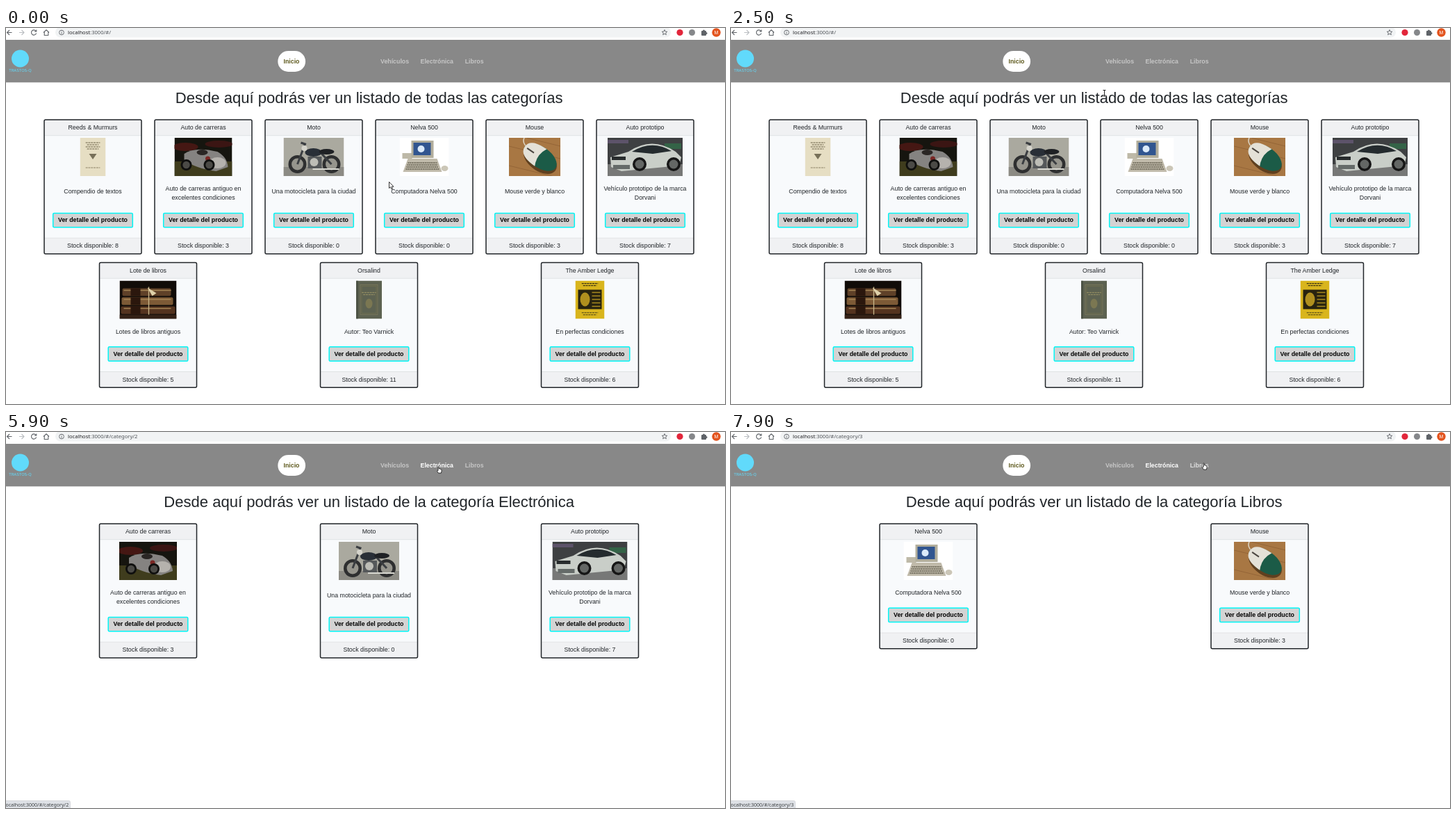
Animation, 1035 px wide and 541 px high, one loop 8000 ms. Source, as an HTML page:

```html
<!DOCTYPE html>
<html lang="es">
<head>
<meta charset="utf-8">
<title>Catálogo</title>
<style>
  html, body { margin: 0; width: 100%; height: 100%; overflow: hidden; background: #fff; }
  svg { display: block; }
  text { font: 8.82px "Liberation Sans", Arial, sans-serif; fill: #212529; white-space: pre; }
  .mid { text-anchor: middle; }
  .bold { font-weight: 700; }
  .button { font-weight: 700; fill: #000; }
  .heading { font-size: 22.06px; }
  .url { font: 7.6px "Noto Sans", sans-serif; fill: #202124; }
  .url tspan { fill: #505459; }
  .status { font: 7px "Noto Sans", sans-serif; fill: #3c4043; }
  .brand { font: 5.6px "DejaVu Sans", sans-serif; fill: #61dafb; }
</style>
</head>
<body>
<svg id="stage" width="1035" height="541" viewBox="0 0 1035 541"><g id="page"></g><g id="cursor"></g></svg>
<script>
const LOOP = 8000, STEP = 100;
const UNIT = 8.82;            // root font size; spacing follows from it
const LINE = UNIT * 1.5;

const rect = (x, y, w, h, fill, more = '') =>
  `<rect x="${x}" y="${y}" width="${w}" height="${h}" fill="${fill}" ${more}/>`;
const oval = (x, y, rx, ry, fill, more = '') =>
  `<ellipse cx="${x}" cy="${y}" rx="${rx}" ry="${ry}" fill="${fill}" ${more}/>`;
const disc = (x, y, r, fill, more) => oval(x, y, r, r, fill, more);
const shape = (d, fill) => `<path d="${d}" fill="${fill}"/>`;
const line = (d, color, w = 1, more = '') =>
  `<path d="${d}" fill="none" stroke="${color}" stroke-width="${w}" ${more}/>`;
const text = (x, y, s, cls = 'mid', more = '') => `<text x="${x}" y="${y}" class="${cls}" ${more}>${s}</text>`;
const repeat = (n, draw) => Array.from({ length: n }, (_, i) => draw(i)).join('');

// Parts shared by the product pictures, which are all H tall
const H = 55;
const wheels = (xs, y, r, tyre, hub) => xs.map(x => disc(x, y, r, tyre) + disc(x, y, r * .65, hub)).join('');
const lettering = (w, y, n, color) =>
  repeat(n, i => line(`M${w * .22 + i % 2 * 2} ${y + i * 3}H${w * .78 - i % 2 * 2}`, color, 1.3, 'stroke-dasharray="3 .8"'));
const frame = (w, inset, color) =>
  rect(inset, inset, w - 2 * inset, H - 2 * inset, 'none', `stroke="${color}" stroke-width=".7"`);

const pictures = {
  songs: [37, w => rect(0, 0, w, H, '#e6dec3') + lettering(w, 7, 4, '#938a70') +
    shape('M13 23H24L18.5 31z', '#777059') + lettering(w, 43, 1, '#aaa185')],
  racer: [83, w => rect(0, 0, w, H, '#16150f') + rect(0, 34, w, 21, '#3f3c1d') +
    oval(16, 13, 18, 6, '#451713') + oval(64, 9, 20, 5, '#3b1513') +
    shape('M14 23Q30 12 62 20Q76 28 77 42L60 48Q30 44 14 32z', '#858381') +
    oval(62, 36, 12, 8, '#b5b2ad') + oval(40, 21, 8, 4, '#2a2624') + disc(48, 30, 3.5, '#7a2724') +
    wheels([17, 50], 39, 8, '#0f0f0e', '#4b4a46')],
  moto: [87, w => rect(0, 0, w, H, '#aaa99f') + rect(0, 42, w, 13, '#8c8b84') +
    wheels([20, 69], 38, 13, '#2e2f30', '#96958d') + line('M20 38 31 9 25 7M69 38 54 22', '#3b3e42', 3) +
    oval(43, 21, 12, 6, '#292f37') + oval(62, 20, 11, 4, '#1f2124') + disc(30, 15, 4, '#d4d3cb') +
    rect(35, 27, 20, 17, '#55585a') + disc(44, 35, 6, '#bdbdb6') + line('M42 45H80', '#d9d9d2', 2)],
  computer: [71, w => rect(0, 0, w, H, '#fff') + rect(4, 22, 14, 8, '#beb9a8') + rect(17, 4, 32, 25, '#b2ae9c') +
    rect(20, 7, 25, 18, '#315590') + disc(31, 16, 5, '#dbeafa') +
    shape('M12 30H54L61 49H5z', '#c0baaa') +
    repeat(4, i => line(`M${12 - i} ${36 + i * 3}H${54 + i}`, '#777262', 1.8, 'stroke-dasharray="2 .7"')) +
    oval(65, 44, 5, 4, '#cbc6b7')],
  mouse: [74, w => rect(0, 0, w, H, '#a87743') + line('M0 12 74 30M0 40 74 58M25 0 74 12', '#946537') +
    line('M29 16Q18 8 22 0', '#ddd6c6', 1.5) +
    `<g transform="rotate(35 45 28)">${oval(47, 31, 27, 16, '#60401f') + oval(45, 28, 27, 15, '#1b5b47') +
    shape('M46 13Q18 13 18 28T46 43Q38 28 46 13z', '#e4e1d7') + line('M22 28H34', '#4b4640', 2)}</g>`],
  concept: [108, w => rect(0, 0, w, H, '#3e4042') + rect(0, 38, w, 17, '#777877') +
    rect(0, 3, 30, 5, '#5d536a') + rect(82, 8, 24, 8, '#346347') +
    shape('M4 28 30 20Q64-3 98 20L106 28 103 40 20 48 5 42z', '#c9cec8') +
    shape('M35 20Q64 2 92 19L65 23z', '#242b2e') + rect(6, 27, 20, 5, '#282c2d') + rect(8, 39, 24, 6, '#656b69') +
    wheels([46, 95], 38, 10, '#161616', '#646765')],
  bundle: [82, w => rect(0, 0, w, H, '#110c08') + rect(0, 49, w, 6, '#342116') +
    repeat(3, i => rect(4 - i, 11 + i * 13, 70 + i * 4, 11, ['#5f4128', '#7d5a36', '#54331f'][i], 'rx="2"') +
      line(`M6 ${14 + i * 13}H74`, '#a58555', 1.5) + rect(16, 11 + i * 13, 14, 11, '#2b170d')) +
    line('M42 9V49', '#c8b68a', 1.3) + shape('M40 10 53 18 47 22z', '#dfd2aa')],
  green: [37, w => rect(0, 0, w, H, '#5d6251') + rect(0, 0, 3, H, '#4c5245') + frame(w, 6, '#807c5c') + frame(w, 8, '#74724f') +
    lettering(w, 17, 2, '#918b61') + oval(18.5, 33, 5, 7, '#7b7752')],
  yellow: [42, w => rect(0, 0, w, H, '#d9b51d') + lettering(w, 4, 2, '#3c3415') + rect(4, 13, 34, 28, '#28230f') +
    oval(14, 27, 7, 10, '#b08f1e') + repeat(5, i => line(`M24 ${17 + i * 5}H36`, '#a98a1f', 1.6)) + lettering(w, 46, 2, '#655718')]
};

const [VEHICLES, DEVICES, BOOKS] = [1, 2, 3];
const products = [
  ['Reeds &amp; Murmurs', 'songs', 8, BOOKS, 'Compendio de textos'],
  ['Auto de carreras', 'racer', 3, VEHICLES, 'Auto de carreras antiguo en', 'excelentes condiciones'],
  ['Moto', 'moto', 0, VEHICLES, 'Una motocicleta para la ciudad'],
  ['Nelva 500', 'computer', 0, DEVICES, 'Computadora Nelva 500'],
  ['Mouse', 'mouse', 3, DEVICES, 'Mouse verde y blanco'],
  ['Auto prototipo', 'concept', 7, VEHICLES, 'Vehículo prototipo de la marca', 'Dorvani'],
  ['Lote de libros', 'bundle', 5, BOOKS, 'Lotes de libros antiguos'],
  ['Orsalind', 'green', 11, BOOKS, 'Autor: Teo Varnick'],
  ['The Amber Ledge', 'yellow', 6, BOOKS, 'En perfectas condiciones']
];

const cardHeight = tall => 179.7 + (tall ? LINE : 0);

function card([name, pic, stock, , ...lines], cx, y, tall) {
  const w = 140, bar = 22.7, h = cardHeight(tall), x = cx - w / 2, buttonY = y + h - 58.4;
  const [picWidth, paint] = pictures[pic];
  const firstLine = y + 102.2 + (tall && lines.length < 2 ? LINE / 4 : 0);
  return rect(x, y, w, h, '#f0f1f3') + rect(x, y + bar, w, h - 2 * bar, '#f8fafc') +
    line(`M${x} ${y + bar}h${w}M${x} ${y + h - bar}h${w}`, '#d9dbdd', .7) +
    rect(x, y, w, h, 'none', 'rx="2" stroke="#212529" stroke-width="1.5"') +
    text(cx, y + 14.2, name) +
    `<svg x="${cx - picWidth / 2}" y="${y + 26}" width="${picWidth}" height="${H}">${paint(picWidth)}</svg>` +
    lines.map((s, i) => text(cx, firstLine + i * LINE, s)).join('') +
    rect(cx - 57.3, buttonY, 114.6, 20.3, '#d3d3d3', 'rx="1.5" stroke="#00f5f5" stroke-width="1.5"') +
    text(cx, buttonY + 12.8, 'Ver detalle del producto', 'mid button') +
    text(cx, y + h - 8.6, 'Stock disponible: ' + stock);
}

function grid(category) {
  const items = products.filter(p => !category || p[3] === category);
  let out = '';
  for (let i = 0, y = 132; i < items.length; i += 6) {
    const row = items.slice(i, i + 6), tall = row.some(p => p.length > 5), step = 954 / row.length;
    out += row.map((p, k) => card(p, 45.5 + step * (k + .5), y, tall)).join('');
    y += cardHeight(tall) + 12.6;
  }
  return out;
}

function browserBar(path) {
  const ink = '#5f6368', y = 6.5;
  const arrow = (x, dir, color) => line(`M${x} ${y}h${7 * dir}m${-3.5 * dir}-3.5l${3.5 * dir} 3.5l${-3.5 * dir} 3.5`, color, 1.1);
  const star = repeat(10, i => {
    const a = (i / 5 - .5) * Math.PI, r = i % 2 ? 1.8 : 4;
    return `${i ? 'L' : 'M'}${948 + r * Math.cos(a)} ${y + r * Math.sin(a)}`;
  });
  return rect(71, -1, 886, 14.5, '#f1f3f4', 'rx="7.2"') + arrow(8.5, -1, ink) + arrow(19, 1, '#bbbec2') +
    line('M43 4.3A3.6 3.6 0 1 0 43.6 7.5M43.8 2.5V5H41', ink, 1.1) +
    line('M54 6.5 58 2.8 62 6.5M55.2 6V10.5H60.8V6', ink, 1.1) +
    disc(80, y, 3.4, 'none', `stroke="${ink}" stroke-width=".9"`) + line('M80 6V8.5M80 4.3V5.1', ink, .9) +
    text(89, 9.4, `localhost<tspan>:3000/#/${path}</tspan>`, 'url') + line(star + 'z', ink, .9) +
    disc(970, y, 4.6, '#e2263b') + disc(987.5, y, 4.5, '#85878a') +
    rect(1001, 4, 7, 7, ink, 'rx="1"') + disc(1004.5, 4, 1.5, ink) + disc(1008, 7.5, 1.5, ink) +
    disc(1022.5, y, 6.2, '#e3541e') + text(1022.5, 9, 'M', 'mid', 'style="font-size:7px;fill:#fff"');
}

const links = [['Vehículos', 539], ['Electrónica', 596.5], ['Libros', 660.7]];

function navbar(focused, hovered) {
  const color = id => id === focused ? '#fff' : id === hovered ? '#e1e1e1' : '#c6c6c6';
  return rect(0, 17, 1035, 61.3, '#888') + disc(20.5, 44, 12.5, '#61dafb') +
    text(20.5, 63, 'TRASTOS-Q', 'mid brand') +
    rect(391.3, 33, 39.8, 30, '#fff', 'rx="15"') + text(411, 50.9, 'Inicio', 'mid bold', 'style="fill:#5f5a1e"') +
    links.map(([s, x], i) => text(x, 50.9, s, 'bold', `style="fill:${color(i + 1)}"`)).join('');
}

const statusBar = (path, w) => rect(-4, 530.5, w + 4, 14, '#dee1e6', 'rx="2" stroke="#c9ccd1" stroke-width=".6"') +
  text(-2.4, 539.3, 'localhost:3000/#/' + path, 'status');

// Times at which each category is hovered, focused, routed to and loaded
const never = Infinity;
const visits = [
  { hover: 4100, focus: 4100, route: 4100, load: 4600 },
  { hover: 4900, focus: 5900, route: 5900, load: 6200 },
  { hover: 7300, focus: never, route: 7900, load: never }
];
const current = (event, t) => visits.filter(v => v[event] <= t).length;

// Pointer: smooth moves first, then jumps from link to link; each entry is [time, x, y, kind]
const glides = [[200, 551, 221, 'arrow'], [600, 93, 8, 'beam'], [1000, 589, 68, 'arrow'], [1400, 417, 48, 'hand'],
  [2000, 418, 52, 'hand'], [2500, 535, 89, 'beam']];
const jumps = [[4100, 556, 39.5, 'hand'], [4900, 597, 65, 'hand'], [5200, 597, 50, 'hand'], [5500, 620, 49.5, 'hand'],
  [6400, 617.5, 49, 'hand'], [7100, 637.5, 49, 'hand'], [7300, 690.5, 48.5, 'hand'], [7500, 678, 44.5, 'hand']];

function pointerAt(t) {
  const path = [...glides, ...jumps], next = path.findIndex(p => p[0] > t);
  if (next === 0) return path[0].slice(1);
  const from = path.at(next < 0 ? -1 : next - 1), to = path[next];
  if (!glides.includes(to)) return from.slice(1);
  const k = (t - from[0]) / (to[0] - from[0]), ease = k * k * (3 - 2 * k);
  const mix = i => from[i] + (to[i] - from[i]) * ease;
  return [mix(1), mix(2), k > 0 && k < .75 ? 'arrow' : k ? to[3] : from[3]];
}

const outlined = d => `<path d="${d}" fill="#fff" stroke="#222" stroke-width=".9" stroke-linejoin="round"/>`;
const beam = 'M.5.5H4.5M2.5.5V9M.5 9H4.5';
const cursors = {
  arrow: outlined('M.5.5V9.5L2.6 7.7 4 11 5.6 10.3 4.2 7.2H7z'),
  beam: line(beam, '#fff', 2) + line(beam, '#222'),
  hand: outlined('M2 .8Q2.7 0 3.3.8V3.4Q4.7 3 5.2 3.9 6.9 3.7 7 5.2V7.2L6.3 9.6H2.4L.5 6.7Q.6 5.6 2 6.1z')
};

const page = document.getElementById('page'), cursor = document.getElementById('cursor');
let shown, shownKind;

function draw() {
  const t = Math.floor(performance.now() % LOOP / STEP) * STEP;
  const [hovered, focused, route, list] = ['hover', 'focus', 'route', 'load'].map(e => current(e, t));
  const path = id => id ? 'category/' + id : '';
  const onHome = t >= 1700 && t < 2300;
  const key = [hovered, focused, route, list, onHome, t >= 5200].join();
  if (key !== shown) {
    shown = key;
    const scope = route ? 'la categoría ' + links[route - 1][0] : 'todas las categorías';
    page.innerHTML = browserBar(path(route)) + navbar(focused, t >= 5200 ? hovered : 0) +
      text(522.7, 107.6, 'Desde aquí podrás ver un listado de ' + scope, 'mid heading') + grid(list) +
      (hovered || onHome ? statusBar(path(hovered), hovered === 1 ? 345.5 : hovered ? 92.5 : 62) : '');
  }
  const [x, y, kind] = pointerAt(t);
  if (kind !== shownKind) cursor.innerHTML = cursors[shownKind = kind];
  cursor.setAttribute('transform', `translate(${x} ${y})`);
  requestAnimationFrame(draw);
}
draw();
</script>
</body>
</html>
```
